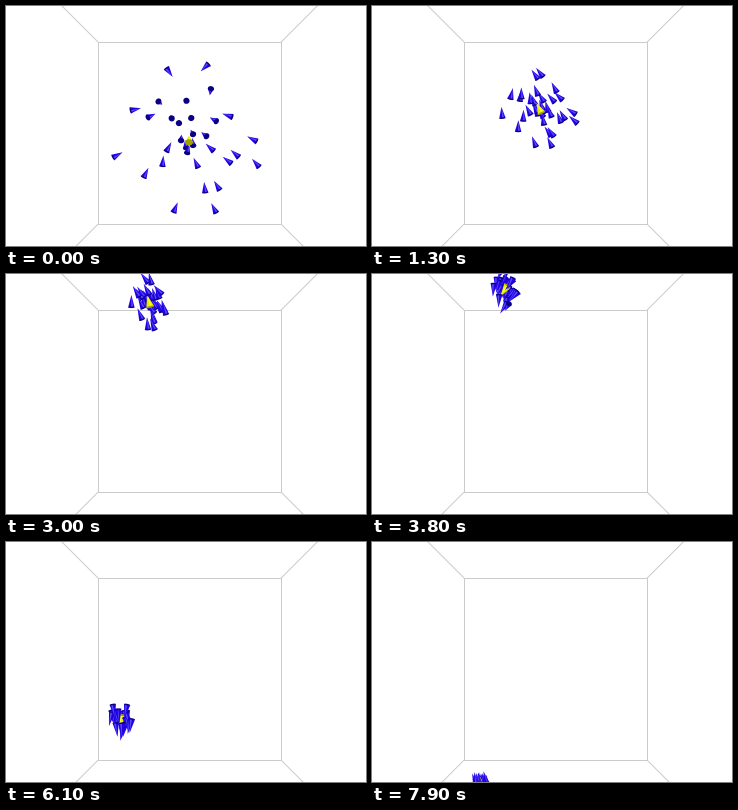
Write a matplotlib script that moves like this. It is 360 px wide and 240 px high and loops after 8000 ms.

```python
import numpy as np
import matplotlib.pyplot as plt
from matplotlib.animation import FuncAnimation
from matplotlib.collections import LineCollection, PolyCollection

W, H, DPI = 360, 240, 100
FRAMES, STEP = 80, 100
MEMBERS = 33
LEADER = 0

# time, centre x, centre y, spread x, spread y of the flock
COURSE = np.array([
    (0.0, 183, 133, 41, 41),
    (0.4, 182, 128, 34, 34),
    (1.3, 167, 102, 21, 20),
    (2.3, 156, 66, 13, 18),
    (3.4, 136, 14, 8, 11),
    (3.8, 132, 17, 6, 10),
    (5.1, 118, 112, 6, 8),
    (6.1, 115, 180, 6, 7),
    (6.9, 118, 235, 6, 6),
    (7.3, 116, 262, 5, 4),
    (7.6, 111, 262, 4, 3),
    (7.9, 109, 240, 4, 3),
])
TIMES, KEYS = COURSE[:, 0], COURSE[:, 1:]
SLOPES = np.gradient(KEYS, TIMES, axis=0)

rng = np.random.default_rng(7)
rank = np.arange(MEMBERS) / (MEMBERS - 1)
radius = 1.9 * np.clip(rank + rng.uniform(-0.06, 0.06, MEMBERS), 0, 1)
bearing = np.arange(MEMBERS) * np.pi * (3 - np.sqrt(5)) + rng.normal(0, 0.3, MEMBERS)
drift = rng.normal(0, 0.12, MEMBERS)
phase = rng.uniform(0, 2 * np.pi, MEMBERS)
radius[LEADER] = 0


def course(t):
    """Centre and spread at the given times (cubic Hermite)."""
    t = np.clip(t, TIMES[0], TIMES[-1] + 0.1)
    k = np.clip(np.searchsorted(TIMES, t, side="right") - 1, 0, len(TIMES) - 2)
    h = (TIMES[k + 1] - TIMES[k])[:, None]
    s = (t - TIMES[k])[:, None] / h
    return (KEYS[k] * (2*s**3 - 3*s**2 + 1) + SLOPES[k] * h * (s**3 - 2*s**2 + s)
            + KEYS[k + 1] * (3*s**2 - 2*s**3) + SLOPES[k + 1] * h * (s**3 - s**2))


def positions(t):
    # The outermost members fall behind after the turn and catch up again.
    late = 0.6 * rank**40 * np.exp(-((t - 4.9) / 0.8)**2)
    state = course(t - late)
    angle = bearing + drift * t
    offset = radius[:, None] * np.column_stack([np.cos(angle), np.sin(angle)])
    return state[:, :2] + state[:, 2:] * offset


def motion(t, dt=0.04):
    """Position, heading and speed of every member at t seconds."""
    vx, vy = ((positions(t + dt) - positions(t)) / dt).T
    heading = np.arctan2(vy, vx) + 0.25 * np.sin(phase + 2 * t)
    return positions(t), heading, np.hypot(vx, vy)


BODY, SHINE, BASE = "#2200e6", "#574cf0", "#0a0084"
LEADER_COLORS = ["#e8e800", "#ffff30", "#a0a000"]
ANGLES = np.linspace(0, 2 * np.pi, 14)
ORDER = np.insert(np.arange(1, MEMBERS), 14, LEADER)


def cone(pos, heading, speed, length, width):
    """Polygons of a cone seen from the side, shorter when it points in depth."""
    ahead = np.array([np.cos(heading), np.sin(heading)])
    side = np.array([-ahead[1], ahead[0]])
    flat = np.clip(speed / 20, 0.3, 0.97)
    tip = pos + ahead * length * flat / 2
    tail = pos - ahead * length * flat / 2
    depth = width * np.sqrt(1 - flat**2)
    rim = (tail + np.outer(np.cos(ANGLES), side * width)
           + np.outer(np.sin(ANGLES), ahead * depth))
    body = np.array([tip, tail + side * width, tail - side * width])
    shine = np.array([tip, tail + side * width * 0.55, tail - side * width * 0.05])
    return [body, shine, rim]


fig = plt.figure(figsize=(W / DPI, H / DPI), dpi=DPI, facecolor="white")
ax = fig.add_axes([0, 0, 1, 1])
ax.set(xlim=(0, W), ylim=(H, 0))
ax.axis("off")

L, T, R, B = 92.1, 36.1, 275.1, 218.1
room = [[(L, T), (R, T), (R, B), (L, B), (L, T)],
        [(L, T), (L - 37, T - 37)], [(R, T), (R + 37, T - 37)],
        [(L, B), (L - 23, B + 23)], [(R, B), (R + 23, B + 23)]]
ax.add_collection(LineCollection(room, colors="#cbcbcb", linewidths=0.72))

colors = []
for i in ORDER:
    colors += LEADER_COLORS if i == LEADER else [BODY, SHINE, BASE]
flock = PolyCollection([], facecolors=colors, edgecolors="none", zorder=3)
ax.add_collection(flock)


def draw(frame):
    t = frame * STEP / 1000
    pos, heading, speed = motion(t)
    length = np.interp(t, [0, 2.3, 5], [11, 12, 14.5])
    shapes = []
    for i in ORDER:
        width = 4 if i == LEADER else 3.2
        shapes += cone(pos[i], heading[i], speed[i], length, width)
    flock.set_verts(shapes)
    return [flock]


anim = FuncAnimation(fig, draw, frames=FRAMES, interval=STEP, repeat=True,
                     repeat_delay=0, blit=False)
plt.show()
```
